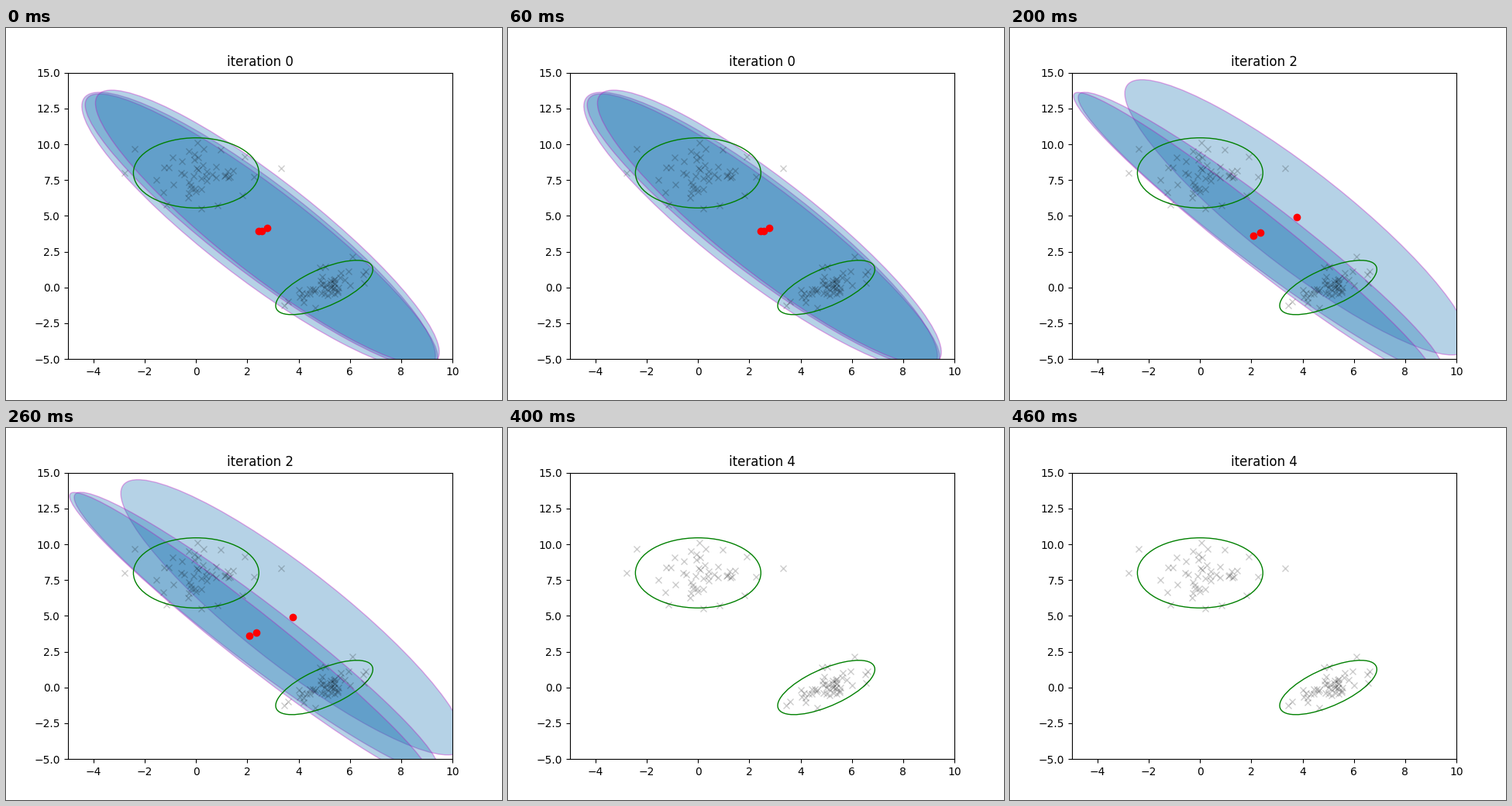
These frames come from a looping animation (640 by 480 pixels, 500 ms). A matplotlib script:

```python
import numpy as np
import matplotlib.pyplot as plt
from matplotlib.animation import FuncAnimation
from matplotlib.patches import Ellipse

plt.rcParams["text.kerning_factor"] = 6
rng = np.random.RandomState(7)

RADIUS = 2.448   # the 95 % contour of a 2D Gaussian, in standard deviations
CORE = 0.75      # spread of the inner samples, relative to the whole cluster
SAMPLES = 50

# Gaussians: centre x, centre y, half width, half height, correlation
TRUE = [(0, 8, 2.448, 2.448, 0), (5, 0, 1.896, 1.896, 0.667)]
FITS = [
    [(2.44, 3.94, 6.90, 9.69, -0.90),
     (2.55, 3.94, 6.88, 9.58, -0.92),
     (2.78, 4.18, 6.71, 9.60, -0.905)],
    [(2.12, 3.70, 6.74, 9.66, -0.90),
     (2.68, 4.06, 6.26, 9.48, -0.875),
     (2.62, 4.06, 5.75, 9.40, -0.797)],
    [(3.77, 4.90, 6.71, 9.61, -0.90),
     (2.35, 3.83, 7.11, 9.80, -0.963),
     (2.09, 3.62, 7.03, 10.0, -0.974)],
    [(-1.36, 1.48, 6.59, 9.40, -0.893),
     (2.35, 3.83, 0.83, 1.26, -0.78),
     (3.56, 4.51, 0.31, 0.36, -0.85)],
    [],
]

# Samples on the rim of each cluster; the rest are drawn at random
RIMS = [
    [(0.05, 10.11), (-2.4, 9.68), (0.97, 9.62), (1.9, 9.13), (3.33, 8.32),
     (-2.78, 8.0), (2.27, 7.73), (1.8, 6.43), (0.85, 5.7), (0.2, 5.51),
     (-1.16, 5.78)],
    [(6.11, 2.18), (5.03, 1.45), (4.83, 1.37), (6.6, 1.13), (6.52, 0.91),
     (6.55, 0.29), (3.45, -1.28), (4.66, -1.44)],
]


def covariance(hx, hy, rho):
    return np.array([[hx * hx, rho * hx * hy], [rho * hx * hy, hy * hy]])


def sample(gauss, rim):
    """Random core of a cluster, completed by its rim."""
    cov = covariance(*gauss[2:]) * (CORE / RADIUS) ** 2
    core = rng.multivariate_normal(gauss[:2], cov, SAMPLES - len(rim))
    return np.vstack([rim, core])


def contour(cx, cy, hx, hy, rho, **style):
    """Ellipse of constant density for a 2D Gaussian."""
    values, vectors = np.linalg.eigh(covariance(hx, hy, rho))
    angle = np.degrees(np.arctan2(vectors[1, 1], vectors[0, 1]))
    minor, major = 2 * np.sqrt(values)
    return Ellipse((cx, cy), major, minor, angle=angle, **style)


clusters = [sample(gauss, rim) for gauss, rim in zip(TRUE, RIMS)]
fig, ax = plt.subplots(figsize=(6.4, 4.8), dpi=100)


def draw(step):
    ax.clear()
    for cluster in clusters:
        ax.plot(*cluster.T, "kx", alpha=0.2)
    for fit in FITS[step]:
        ax.add_patch(contour(*fit, fc="C0", ec="m", alpha=0.33))
        ax.plot(*fit[:2], "ro")
    for gauss in TRUE:
        ax.add_patch(contour(*gauss, fc="none", ec="g"))
    ax.set_xlim(-5, 10)
    ax.set_ylim(-5, 15)
    ax.set_title(f"iteration {step}")


anim = FuncAnimation(fig, draw, frames=len(FITS), init_func=lambda: draw(0),
                     interval=100, repeat=True, repeat_delay=0)
plt.show()
```
